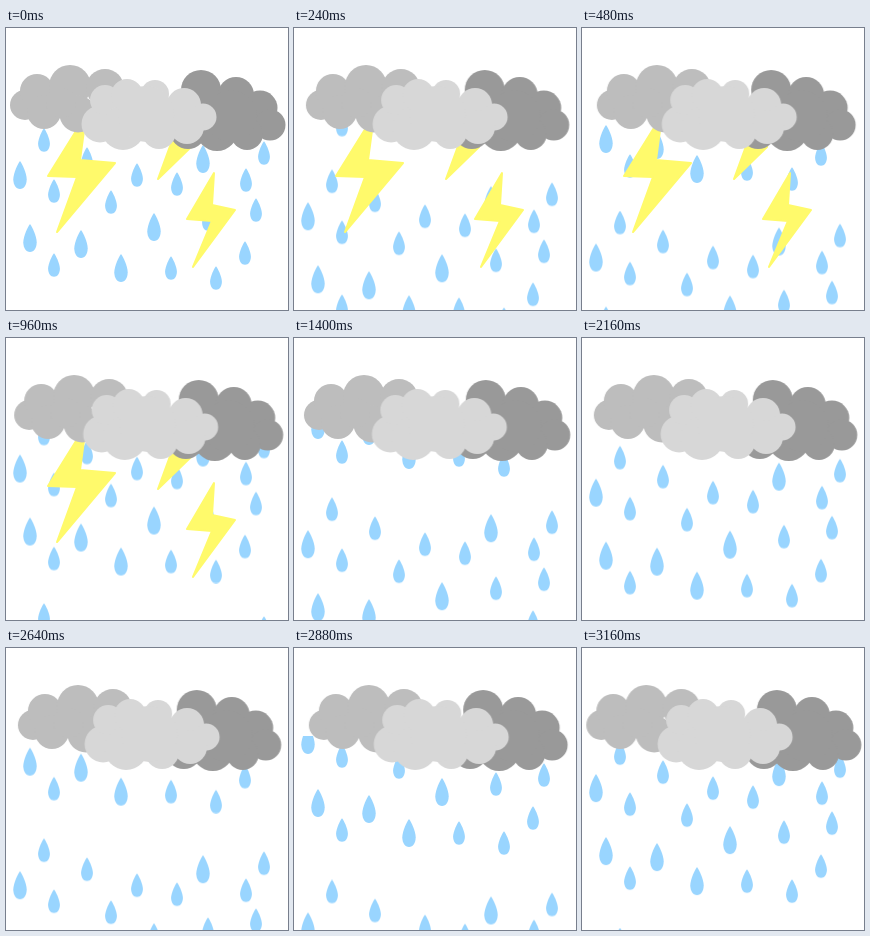
Animation of 282 by 282 pixels, one loop 3200 ms. Source, as an HTML page:

```html
<!DOCTYPE html>
<html lang="en">
<head>
<meta charset="utf-8">
<title>Thunderstorm</title>
<style>
  html, body { margin: 0; width: 100%; height: 100%; overflow: hidden; background: #fff; }
  svg { display: block; width: 100%; height: 100%; }

  /* Three copies of one shower follow each other down in 40 ms steps. */
  .rain use {
    animation: fall 3200ms steps(80) infinite;
    animation-delay: calc(var(--step) * -40ms - 8ms);
  }
  @keyframes fall {
    from { transform: translateY(-247.7px); }
    to { transform: translateY(302.7px); }
  }

  .bolts {
    fill: #fffa6b; stroke: #fffa6b; stroke-width: 2; stroke-linejoin: round;
    animation: flash 3200ms step-end infinite;
  }
  @keyframes flash {
    0% { visibility: visible; }
    33.33%, 100% { visibility: hidden; }
  }

  .cloud { animation: sway 400ms cubic-bezier(.37, 0, .63, 1) infinite alternate; }
  @keyframes sway {
    from { transform: translateX(0); }
    to { transform: translateX(var(--shift)); }
  }
  .left { fill: #bdbdbd; --shift: 12px; }
  .right { fill: #999; --shift: -6.5px; }
  .front { fill: #d7d7d7; --shift: 4.7px; }

  .drop { fill: #99d5ff; }
  .small { fill: none; marker: url(#small); }
  .big { fill: none; marker: url(#big); }
  marker { overflow: visible; }
</style>
</head>
<body>
<svg viewBox="0 0 282 282">
  <defs>
    <path id="drop" class="drop" d="M0-1C.3-.85 1-.1 1 .3C1 .7 .6 1 0 1S-1 .7-1 .3S-.3-.85 0-1Z"/>
    <marker id="small" markerUnits="userSpaceOnUse"><use href="#drop" transform="scale(5.9 11.8)"/></marker>
    <marker id="big" markerUnits="userSpaceOnUse"><use href="#drop" transform="scale(6.7 14)"/></marker>
    <!-- One drop stands on each point. -->
    <g id="shower">
      <polyline class="small" points="38,112 48,163 81,131 131,147 105,174 171,156 258,125 240,152 250,182 202,191 48,237 165,240 210,250 239,225"/>
      <polyline class="big" points="14,147 197,131 148,199 24,210 75,216 115,240"/>
    </g>
    <clipPath id="sky"><rect y="88" width="282" height="194"/></clipPath>
  </defs>

  <g class="rain" clip-path="url(#sky)">
    <use href="#shower" style="--step:36"/>
    <use href="#shower" y="-2.7" style="--step:10"/>
    <use href="#shower" y=".8" style="--step:63"/>
  </g>

  <g class="bolts">
    <path d="M75 95H79L74 132L109 135L51 204L71 149L42 148Z"/>
    <path d="M167 110L152 151L185 119V110Z"/>
    <path d="M208 145L206 177L229 182L187 239L206 193L181 191Z"/>
  </g>

  <g class="cloud left">
    <circle cx="19" cy="77" r="15"/>
    <circle cx="31" cy="63" r="17"/>
    <circle cx="64" cy="58" r="21"/>
    <circle cx="99" cy="60" r="19"/>
    <circle cx="38" cy="84" r="17"/>
    <circle cx="72" cy="86" r="18.5"/>
    <circle cx="55" cy="75" r="15"/>
  </g>
  <g class="cloud right">
    <circle cx="195" cy="62" r="20"/>
    <circle cx="230" cy="67" r="18"/>
    <circle cx="254" cy="80" r="17.5"/>
    <circle cx="264" cy="97" r="15.5"/>
    <circle cx="241" cy="106" r="16"/>
    <circle cx="211" cy="102" r="21"/>
    <circle cx="182" cy="103" r="18"/>
    <circle cx="225" cy="88" r="26"/>
  </g>
  <g class="cloud front">
    <circle cx="94" cy="96" r="18.5"/>
    <circle cx="99" cy="72" r="15"/>
    <circle cx="121" cy="67" r="16"/>
    <circle cx="149" cy="66" r="14"/>
    <circle cx="178" cy="77" r="17"/>
    <circle cx="197" cy="89" r="13.5"/>
    <circle cx="181" cy="99" r="17"/>
    <circle cx="153" cy="104" r="17"/>
    <circle cx="117" cy="100" r="22"/>
    <circle cx="140" cy="86" r="28"/>
  </g>
</svg>
</body>
</html>
```
